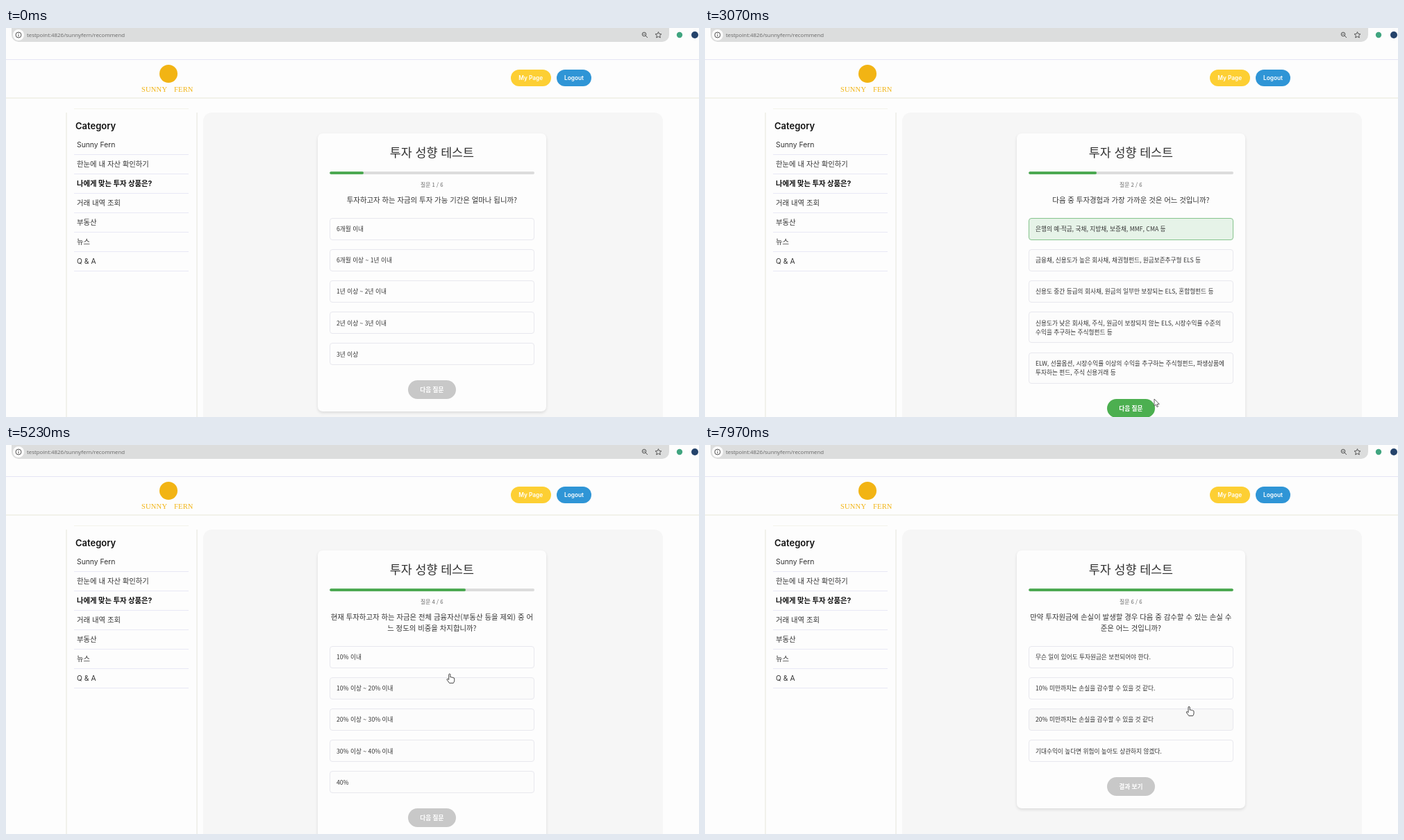
Recreate the animation shown at these times as an HTML page. Size 998x561 px, loop 8 s.

```html
<!DOCTYPE html>
<html lang="ko">
<head>
<meta charset="utf-8">
<title>투자 성향 테스트</title>
<style>
  * { box-sizing: border-box; }
  html, body { margin: 0; width: 100%; height: 100%; overflow: hidden; background: #fdfdfd; }
  body { position: relative; color: #333; font-family: "Noto Sans CJK KR", "Noto Sans CJK", sans-serif; }
  .abs, .quiz, .pill, .panel { position: absolute; }
  .line { position: absolute; height: 1px; }

  .address { left: 8px; top: -1px; width: 947px; height: 21px; border-radius: 0 0 10px 10px; background: #dcdddd; }
  .url { left: 30px; top: 3px; font: 7.9px/14px "Open Sans", sans-serif; color: #666; white-space: nowrap; }
  .brand { top: 82px; font: 10.5px/14px "Liberation Serif", serif; color: #f2b414; letter-spacing: .2px; }
  .pill { top: 60px; height: 24px; border-radius: 12px; color: #fff; text-align: center; font: 600 8.3px/24px Inter, sans-serif; }

  .menu { left: 86px; top: 122px; width: 190px; height: 450px; border: solid #f1f1ec; border-width: 0 2px; }
  .menu-title { left: 100px; top: 131px; font: 600 13px/20px Inter, sans-serif; color: #111; }
  .menu-item { left: 98px; width: 165px; height: 28px; padding-left: 4px; border-bottom: 1px solid #e8e8f5;
    font: 10.35px/27px Inter, "Noto Sans CJK KR", "Noto Sans CJK", sans-serif; white-space: nowrap; }
  .menu-item.on { font-weight: 700; color: #111; }
  .panel { left: 284px; top: 122px; width: 662px; height: 460px; border-radius: 12px; background: #f6f6f6; }

  .quiz { left: 449px; top: 152px; width: 329px; padding: 0 17.3px 18px 17px; border-radius: 7px; background: #fdfdfd;
    box-shadow: 0 2px 4px rgba(0, 0, 0, .11); white-space: nowrap; visibility: hidden; }
  .quiz h1 { margin: 0; height: 55px; font-size: 17.33px; line-height: 54px; font-weight: 400; text-align: center; }
  .track { height: 4px; border-radius: 2px; background: #dcdcdc; overflow: hidden; }
  .bar { height: 4px; border-radius: 2px; background: #4ca952; }
  .count { margin-top: 8.3px; font-size: 7.8px; line-height: 13.33px; color: #666; text-align: center; }
  .question { margin: 7.3px -10px 18px; font-size: 10.4px; line-height: 16px; font-weight: 500; text-align: center; }
  .option { margin-bottom: 13.45px; padding: 8.2px 9px; border: 1px solid; border-radius: 4px; font-size: 8.67px; line-height: 13.33px; }
  .option:last-child { margin-bottom: 0; }
  .next { width: 69px; height: 27px; margin: 22px auto 0; border-radius: 14px; color: #fff;
    font-size: 8.67px; line-height: 27px; font-weight: 700; text-align: center; }
  svg { position: absolute; left: 0; top: 0; overflow: visible; }
</style>
</head>
<body>
<div class="abs address"></div>
<div class="abs url">testpoint:4826/sunnyfern/recommend</div>
<svg width="998" height="120" fill="none" stroke="#555">
  <circle cx="18" cy="10" r="8" fill="#fdfdfd" stroke="none"/>
  <circle cx="18" cy="10" r="4"/>
  <path d="M18 9.5v2.8M18 7.5v1"/>
  <circle cx="919" cy="9" r="2.8"/>
  <path d="M921 11l3 3M917.7 9h2.6"/>
  <path d="M939.5 5.6l1.3 2.9 3.1.3-2.3 2.1.7 3.1-2.8-1.6-2.8 1.6.7-3.1-2.3-2.1 3.1-.3z"/>
  <g stroke="none">
    <circle cx="970" cy="10" r="4.2" fill="#41a580"/>
    <circle cx="992" cy="10" r="5" fill="#24436b"/>
    <circle cx="234" cy="66" r="13" fill="#f2b414"/>
  </g>
</svg>
<div class="line" style="left:0;top:45px;width:998px;background:#e4e4f4"></div>
<div class="line" style="left:0;top:100px;width:998px;height:2px;background:#f2f2ea"></div>
<div class="line" style="left:98px;top:116px;width:165px;background:#f3f3ea"></div>
<div class="abs brand" style="left:195px">SUNNY</div>
<div class="abs brand" style="left:242px">FERN</div>
<div class="pill" style="left:727px;width:57.5px;background:#fdcf33">My Page</div>
<div class="pill" style="left:793px;width:50px;background:#2f95d6">Logout</div>
<div class="abs menu"></div>
<div class="abs menu-title">Category</div>
<div class="panel"></div>
<div id="quizzes"></div>
<svg id="cursor" width="14" height="18" stroke-linejoin="round">
  <path id="arrow" d="M0 0V10.2L2.4 8 4 11.6 5.6 10.9 4 7.4H7.2Z" fill="#fff" stroke="#555" stroke-width=".9"/>
  <path id="hand" d="M-1 1Q0-.6 1.2 1V5.2Q2.2 4.4 3.2 5.5Q4.4 4.8 5.2 6Q6.8 5.6 7 7.2V10Q6.8 12 5.6 13.6H-.2Q-1.6 11.4-3.6 9Q-4 7.2-2.4 7.6L-1 8.8Z" fill="#fff" stroke="#333" stroke-width=".9"/>
</svg>
<script>
const LOOP = 8000, FADE = 300;

const menu = ['Sunny Fern', '한눈에 내 자산 확인하기', '나에게 맞는 투자 상품은?', '거래 내역 조회', '부동산', '뉴스', 'Q &amp; A'];

// start: question appears; pick: first option is chosen
const quizzes = [
  { start: 0, pick: 950, question: '투자하고자 하는 자금의 투자 가능 기간은 얼마나 됩니까?',
    options: ['6개월 이내', '6개월 이상 ~ 1년 이내', '1년 이상 ~ 2년 이내', '2년 이상 ~ 3년 이내', '3년 이상'] },
  { start: 1700, pick: 2740, question: '다음 중 투자경험과 가장 가까운 것은 어느 것입니까?',
    options: ['은행의 예·적금, 국채, 지방채, 보증채, MMF, CMA 등',
      '금융채, 신용도가 높은 회사채, 채권형펀드, 원금보존추구형 ELS 등',
      '신용도 중간 등급의 회사채, 원금의 일부만 보장되는 ELS, 혼합형펀드 등',
      '신용도가 낮은 회사채, 주식, 원금이 보장되지 않는 ELS, 시장수익률 수준의<br>수익을 추구하는 주식형펀드 등',
      'ELW, 선물옵션, 시장수익률 이상의 수익을 추구하는 주식형펀드, 파생상품에<br>투자하는 펀드, 주식 신용거래 등'] },
  { start: 3330, pick: 4130, question: '금융상품 투자에 대한 본인의 지식수준은 어느 정도라고 생각하십니<br>까?',
    options: ['[매우 낮은 수준] 투자의사 결정을 스스로 내려본 경험이 없는 정도',
      '[낮은 수준] 주식과 채권의 차이를 구별할 수 있는 정도',
      '[높은 수준] 투자할 수 있는 대부분의 금융상품의 차이를 구별할수 있는 정도',
      '[매우 높은 수준] 금융상품을 비롯하여 모든 투자대상 상품의 차이를 이해할<br>수있는 정도'] },
  { start: 4770, pick: 5550, question: '현재 투자하고자 하는 자금은 전체 금융자산(부동산 등을 제외) 중 어<br>느 정도의 비중을 차지합니까?',
    options: ['10% 이내', '10% 이상 ~ 20% 이내', '20% 이상 ~ 30% 이내', '30% 이상 ~ 40% 이내', '40%'] },
  { start: 6230, pick: 6830, question: '다음 중 당신의 수입원을 가장 잘 나타내고 있는 것은 어느 것입니까?',
    options: ['현재 일정한 수입이 발생하고 있으며, 향후 현재 수준을 유지하거나 증가할 것<br>으로 예상된다',
      '현재 일정한 수입이 발생하고 있으나, 향후 감소하거나 불안정할 것으로 예상<br>된다.',
      '현재 일정한 수입이 없으며, 연금이 주수입원이다.'] },
  { start: 7300, pick: Infinity, question: '만약 투자원금에 손실이 발생할 경우 다음 중 감수할 수 있는 손실 수<br>준은 어느 것입니까?',
    options: ['무슨 일이 있어도 투자원금은 보전되어야 한다.', '10% 미만까지는 손실을 감수할 수 있을 것 같다.',
      '20% 미만까지는 손실을 감수할 수 있을 것 같다', '기대수익이 높다면 위험이 높아도 상관하지 않겠다.'] },
];

// cursor stops: time, x, y
const path = [
  [250, 1010, 330], [800, 640, 290], [1010, 640, 291], [1330, 629, 470], [1560, 624, 520], [1760, 624, 520],
  [2300, 650, 290], [2780, 650, 292], [3070, 647, 535], [3180, 630, 545], [3400, 630, 545],
  [3900, 660, 304], [4140, 660, 306], [4330, 666, 417], [4580, 630, 504], [4820, 630, 504],
  [5350, 640, 304], [5600, 640, 306], [6000, 628, 531], [6260, 627, 531],
  [6650, 640, 295], [6840, 640, 297], [7030, 632, 432], [7150, 625, 454], [7360, 625, 454], [7970, 697, 377],
];

const $ = id => document.getElementById(id);
const clamp = v => Math.min(1, Math.max(0, v));
const smooth = v => v * v * (3 - 2 * v);
const fade = elapsed => { const v = clamp(elapsed / FADE); return 1 - (1 - v) ** 2.2; };
const mix = (from, to, amount) => `color-mix(in srgb, ${to} ${(amount * 100).toFixed(1)}%, ${from})`;

document.querySelector('.menu-title').insertAdjacentHTML('afterend', menu.map((label, i) =>
  `<div class="abs menu-item ${i === 2 ? 'on' : ''}" style="top:${155 + i * 28}px">${label}</div>`).join(''));

$('quizzes').innerHTML = quizzes.map((quiz, i) => `
  <div class="quiz">
    <h1>투자 성향 테스트</h1>
    <div class="track"><div class="bar"></div></div>
    <div class="count">질문 ${i + 1} / 6</div>
    <div class="question">${quiz.question}</div>
    <div class="options">${quiz.options.map(text => `<div class="option">${text}</div>`).join('')}</div>
    <div class="next">${i === 5 ? '결과 보기' : '다음 질문'}</div>
  </div>`).join('');

document.querySelectorAll('.quiz').forEach((card, i) => {
  const bar = card.querySelector('.bar');
  const next = card.querySelector('.next');
  const optionBoxes = [...card.querySelectorAll('.option')];
  const targets = [...optionBoxes, next];
  const rects = targets.map(el => el.getBoundingClientRect());
  Object.assign(quizzes[i], { card, bar, next, optionBoxes, targets, rects });
});

function cursorAt(t) {
  const i = path.findIndex(stop => stop[0] > t);
  if (i === 0) return path[0].slice(1);
  if (i < 0) return path.at(-1).slice(1);
  const [t0, x0, y0] = path[i - 1], [t1, x1, y1] = path[i];
  const k = smooth((t - t0) / (t1 - t0));
  return [x0 + (x1 - x0) * k, y0 + (y1 - y0) * k];
}

function hovered(quiz, t) {
  const [x, y] = cursorAt(t);
  return quiz.rects.findIndex((r, i) => {
    const inset = i === quiz.rects.length - 1 ? 4 : 0;
    return x > r.left + inset && x < r.right - inset && y + 9 > r.top && y < r.bottom;
  });
}

function draw(t) {
  const index = quizzes.findLastIndex(quiz => quiz.start <= t);
  const quiz = quizzes[index];
  quizzes.forEach((q, i) => q.card.style.visibility = i === index ? 'visible' : 'hidden');

  const since = t - quiz.start;
  const entered = index ? fade(since) : 1;
  quiz.bar.style.width = (index + entered) / 6 * 100 + '%';

  const active = Math.max(1 - entered, fade(t - quiz.pick));
  const glow = quiz.targets.map(() => 0);
  const samples = 8;
  for (let i = 0; i < samples; i++) {
    const hit = hovered(quiz, t - i * FADE / samples);
    if (hit >= 0) glow[hit] += 1 / samples;
  }

  quiz.optionBoxes.forEach((box, i) => {
    const chosen = i ? 0 : active;
    box.style.background = mix(mix('#fdfdfd', '#f8f8f8', glow[i]), '#e6f3e8', chosen);
    box.style.borderColor = mix('#e8e8ee', '#86c48d', chosen);
  });
  quiz.next.style.background = mix('#c8c8c8', mix('#4caf50', '#45a049', glow.at(-1)), active);

  const [x, y] = cursorAt(t);
  const pointing = hovered(quiz, t) >= 0;
  $('cursor').style.transform = `translate(${x}px, ${y}px)`;
  $('hand').style.display = pointing ? '' : 'none';
  $('arrow').style.display = pointing ? 'none' : '';
}

function tick() {
  draw(performance.now() % LOOP);
  requestAnimationFrame(tick);
}
tick();
</script>
</body>
</html>
```
